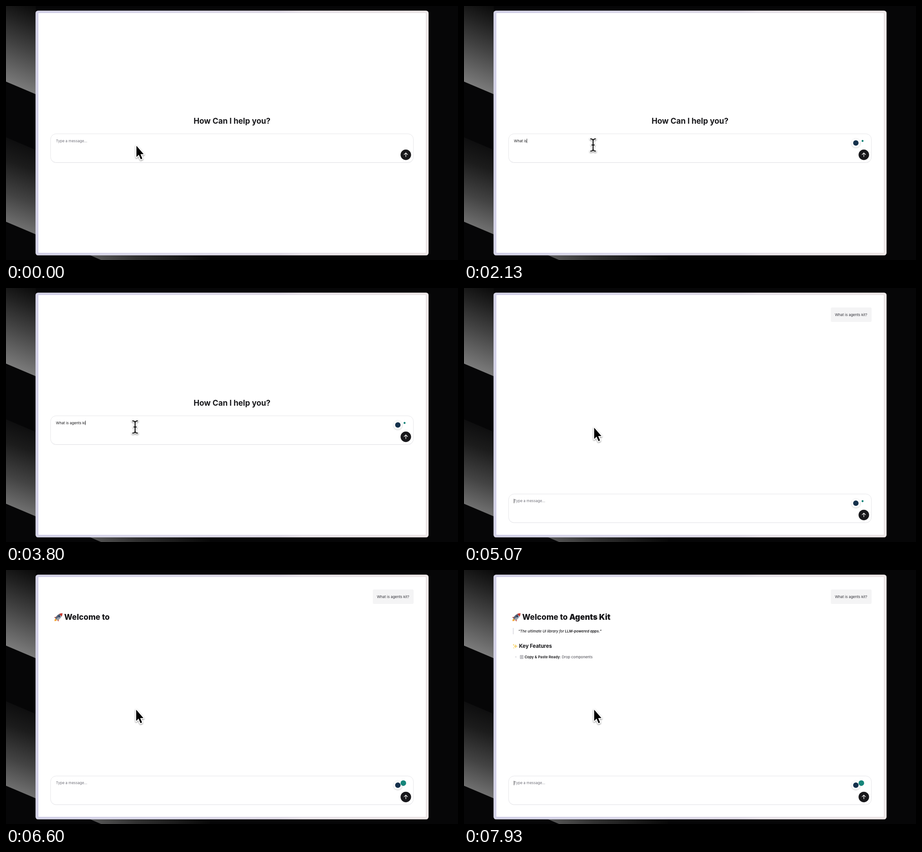
Recreate the animation shown at these times as an HTML page. Size 998 by 561 pixels, loop 8 s.

```html
<!DOCTYPE html>
<html lang="en">
<head>
<meta charset="utf-8">
<title>Chat demo</title>
<style>
  html, body { margin: 0; width: 100%; height: 100%; overflow: hidden; background: #030304; }
  svg { display: block; width: 998px; height: 561px; }
  text { font: 400 8.04px Inter, sans-serif; font-optical-sizing: none; fill: #18181b; white-space: pre; }
  .title { font-size: 17.2px; font-weight: 700; }
  #answer .title { font-weight: 800; }
  #answer .title .strong { font-weight: 900; }
  .quote { font-size: 7.95px; font-style: italic; font-weight: 500; }
  .quote .strong, .item .strong { font-weight: 600; }
  .section { font-size: 11.4px; font-weight: 700; }
  .item { fill: #45454d; }
  .item .strong { fill: #18181b; }
  .hint { fill: #71717a; }
</style>
</head>
<body>
<svg viewBox="0 0 998 561">
  <defs>
    <linearGradient id="beamTop" gradientUnits="userSpaceOnUse" x1="66" y1="0" x2="0" y2="167">
      <stop offset="0" stop-color="#0a0a0a"/><stop offset=".24" stop-color="#222"/>
      <stop offset=".55" stop-color="#444"/><stop offset="1" stop-color="#7a7a7a"/>
    </linearGradient>
    <linearGradient id="beamLow" gradientUnits="userSpaceOnUse" x1="66" y1="290" x2="0" y2="477">
      <stop offset="0" stop-color="#070708"/><stop offset=".35" stop-color="#1c1c1c"/>
      <stop offset=".7" stop-color="#434343"/><stop offset="1" stop-color="#6e6e6e"/>
    </linearGradient>
    <linearGradient id="wedge">
      <stop offset="0" stop-color="#5a5a5a"/><stop offset=".4" stop-color="#303030"/>
      <stop offset="1" stop-color="#080808"/>
    </linearGradient>
    <linearGradient id="frame">
      <stop offset="0" stop-color="#d6d5e8"/><stop offset=".3" stop-color="#dedcec"/>
      <stop offset=".62" stop-color="#e0dbe6"/><stop offset=".68" stop-color="#ece7eb"/>
      <stop offset="1" stop-color="#efe9e9"/>
    </linearGradient>
    <linearGradient id="inner">
      <stop offset="0" stop-color="#b9b5de"/><stop offset=".5" stop-color="#cdc8df"/>
      <stop offset="1" stop-color="#dfd5d7"/>
    </linearGradient>
    <filter id="shadow" x="-50%" y="-50%" width="200%" height="200%">
      <feDropShadow dx="0" dy="1.4" stdDeviation="1.4" flood-opacity=".5"/>
    </filter>
    <filter id="soft" x="-50%" y="-50%" width="200%" height="200%">
      <feDropShadow dx="0" dy=".6" stdDeviation="1.3" flood-opacity=".32"/>
    </filter>
    <path id="ibeam" d="M279.5 293.5Q285 293.5 285 298V316Q285 320.5 279.5 320.5M290.5 293.5Q285 293.5 285 298M285 316Q285 320.5 290.5 320.5M282.3 307H287.7"/>
  </defs>

  <rect width="998" height="561" fill="#060607"/>
  <path d="M0 0H66V195L0 167Z" fill="url(#beamTop)"/>
  <path d="M0 290L66 318V504.5L0 476.5Z" fill="url(#beamLow)"/>
  <path d="M182 549H450V561H210Z" fill="url(#wedge)"/>

  <rect x="65.2" y="10.2" width="867.8" height="540.6" rx="5.5" fill="url(#frame)"/>
  <rect x="70.7" y="14.7" width="857" height="531.3" rx="2" fill="#fff" stroke="url(#inner)"/>

  <text id="greeting" class="title" x="499" y="260" text-anchor="middle">How Can I help you?</text>

  <g id="bubble">
    <rect x="810" y="43" width="90" height="32" rx="3" fill="#f4f4f5"/>
    <text x="854.7" y="62" text-anchor="middle" style="fill:#33333a">What is agents kit?</text>
  </g>

  <g id="answer">
    <g>
      <g transform="translate(116.3 103.7) rotate(45) scale(1.12)">
        <path d="M-3 2L-6 7L-2.5 6ZM3 2L6 7L2.5 6Z" fill="#c0392b"/>
        <path d="M-2 6Q-2.5 10 0 11.5Q2.5 10 2 6Z" fill="#f3a531"/>
        <path d="M0 -10.5Q6.5 -3 3 6.5H-3Q-6.5 -3 0 -10.5Z" fill="#9aa3b0"/>
        <path d="M0 -10.5Q-6.5 -3 -3 6.5H-.5Z" fill="#5a6678"/>
        <path d="M0 -10.5Q3.2 -7 3.5 -5H-3.5Q-3.2 -7 0 -10.5Z" fill="#c8392f"/>
        <circle cy="-1.5" r="1.8" fill="#263b5e"/>
      </g>
      <text class="title" x="128.5" y="110"><tspan></tspan><tspan class="strong"></tspan></text>
    </g>
    <g>
      <rect x="107.8" y="128" width="2" height="14" fill="#e1e1e5"/>
      <text class="quote" x="119.8" y="137.6"><tspan></tspan><tspan class="strong"></tspan></text>
    </g>
    <g>
      <path d="M114 163.5Q114.7 167.5 118.5 168.5Q114.7 169.5 114 173.5Q113.3 169.5 109.5 168.5Q113.3 167.5 114 163.5ZM109.5 162.8L110.2 164.6L112 165.3L110.2 166L109.5 167.8L108.8 166L107.5 165.3L108.8 164.6ZM110 170L110.6 171.4L112 172L110.6 172.6L110 174L109.4 172.6L108 172L109.4 171.4Z" fill="#f6d77c"/>
      <text class="section" x="121.6" y="172.2"><tspan></tspan></text>
    </g>
    <g>
      <circle cx="114.5" cy="192" r="1.2" fill="#d1d1d6"/>
      <path d="M124.2 188.7H130.4V195.7H124.2ZM125.5 190.6H129.1M125.5 192.2H129.1M125.5 193.8H129.1" fill="none" stroke="#77777f" stroke-width=".8"/>
      <text class="item" x="133.7" y="195"><tspan class="strong"></tspan><tspan></tspan></text>
    </g>
  </g>

  <g id="composer">
    <rect x="98.5" y="283" width="801" height="63.4" rx="12" fill="#ececef"/>
    <rect x="98.5" y="282.3" width="801" height="63.2" rx="12" fill="#fff" stroke="#e4e4e7" stroke-width=".9"/>
    <text id="hint" class="hint" x="110.3" y="300.6">Type a message...</text>
    <text id="typed" x="110.3" y="300.6"></text>
    <rect id="caret" y="293" width=".9" height="9.6" fill="#27272a"/>
    <circle id="ghost" cx="883" cy="302.3" r="5.8" fill="#eeeeef"/>
    <g id="helper">
      <circle cx="865.2" cy="302.5" r="9.8" fill="#fff" filter="url(#soft)"/>
      <circle cx="865.2" cy="302.5" r="6" fill="#14304b"/>
    </g>
    <circle id="dot" cy="298" fill="#15857a"/>
    <circle cx="882.8" cy="328.6" r="11.6" fill="#18181b"/>
    <path d="M882.8 332.8V324.6M879 328.2L882.8 324.4L886.6 328.2" fill="none" stroke="#fff" stroke-width="1.25" stroke-linecap="round" stroke-linejoin="round"/>
  </g>

  <g id="arrow" filter="url(#shadow)">
    <path d="M288 308.8V333.6L293.3 328.4L297.5 338.4L301 336.9L296.9 327.2H304Z" fill="#000" stroke="#fff" stroke-width="4" stroke-linejoin="round" paint-order="stroke"/>
  </g>
  <g id="beam" filter="url(#shadow)" fill="none" stroke-linecap="round">
    <use href="#ibeam" stroke="#fff" stroke-width="4.6"/>
    <use href="#ibeam" stroke="#000" stroke-width="2"/>
  </g>
</svg>
<script>
  const LOOP = 8000;
  const QUESTION = 'What is agents kit?';
  const at = { hover: 400, focus: 650, type: 1072, send: 4950, stream: 6526, badge: 6450 };
  const KEY_STEP = 168, WORD_STEP = 72, BLINK = 530;
  const $ = id => document.getElementById(id);
  const show = (el, on) => { el.style.display = on ? '' : 'none'; };

  // Each block is a list of [lead, text] runs, one per tspan.
  const blocks = [
    { runs: [['', 'Welcome to'], [' ', 'Agents Kit']], close: '' },
    { runs: [['', '“The ultimate UI library for'], [' ', 'LLM-powered apps.']], close: '”' },
    { runs: [['', 'Key Features']], close: '' },
    { runs: [['', 'Copy & Paste Ready'], ['', ': Drop components']], close: '' }
  ];
  const groups = [...$('answer').children];

  function streamAnswer(count) {
    blocks.forEach(({ runs, close }, i) => {
      const spans = groups[i].querySelectorAll('tspan');
      show(groups[i], count > 0);
      let last = null;
      runs.forEach(([lead, text], j) => {
        const words = text.split(' ');
        const shown = words.slice(0, Math.max(0, count));
        spans[j].textContent = shown.length ? lead + shown.join(' ') : '';
        if (shown.length) last = spans[j];
        count -= words.length;
      });
      if (last) last.textContent += close;
    });
  }

  function render(t) {
    const sent = t >= at.send;
    const keys = sent ? 0 : Math.max(0, Math.min(QUESTION.length, Math.floor((t - at.type) / KEY_STEP) + 1));
    const pointing = t < at.hover || sent;

    show($('greeting'), !sent);
    show($('bubble'), sent);
    $('composer').setAttribute('transform', `translate(0 ${sent ? 172.7 : 0})`);

    $('typed').textContent = QUESTION.slice(0, keys);
    show($('hint'), !keys);
    const idle = sent ? t - 4620 : t - at.focus;
    const typing = keys > 0 && keys < QUESTION.length;
    show($('caret'), t >= at.focus && (typing || idle % (2 * BLINK) < BLINK));
    $('caret').setAttribute('x', 110 + (keys ? $('typed').getComputedTextLength() + .2 : 0));

    show($('ghost'), t >= at.focus && t < at.type);
    show($('helper'), t >= at.type);
    show($('dot'), t >= at.type);
    const badge = t >= at.badge;
    $('dot').setAttribute('cx', badge ? 877.3 : 880);
    $('dot').setAttribute('r', badge ? 6.2 : 2.2);

    show($('arrow'), pointing);
    $('arrow').setAttribute('transform', sent ? 'translate(-.6 -.2)' : '');
    show($('beam'), !pointing);

    streamAnswer(Math.floor((t - at.stream) / WORD_STEP) + 1);
  }

  const start = performance.now();
  function tick() {
    render((performance.now() - start) % LOOP);
    requestAnimationFrame(tick);
  }
  tick();
</script>
</body>
</html>
```
